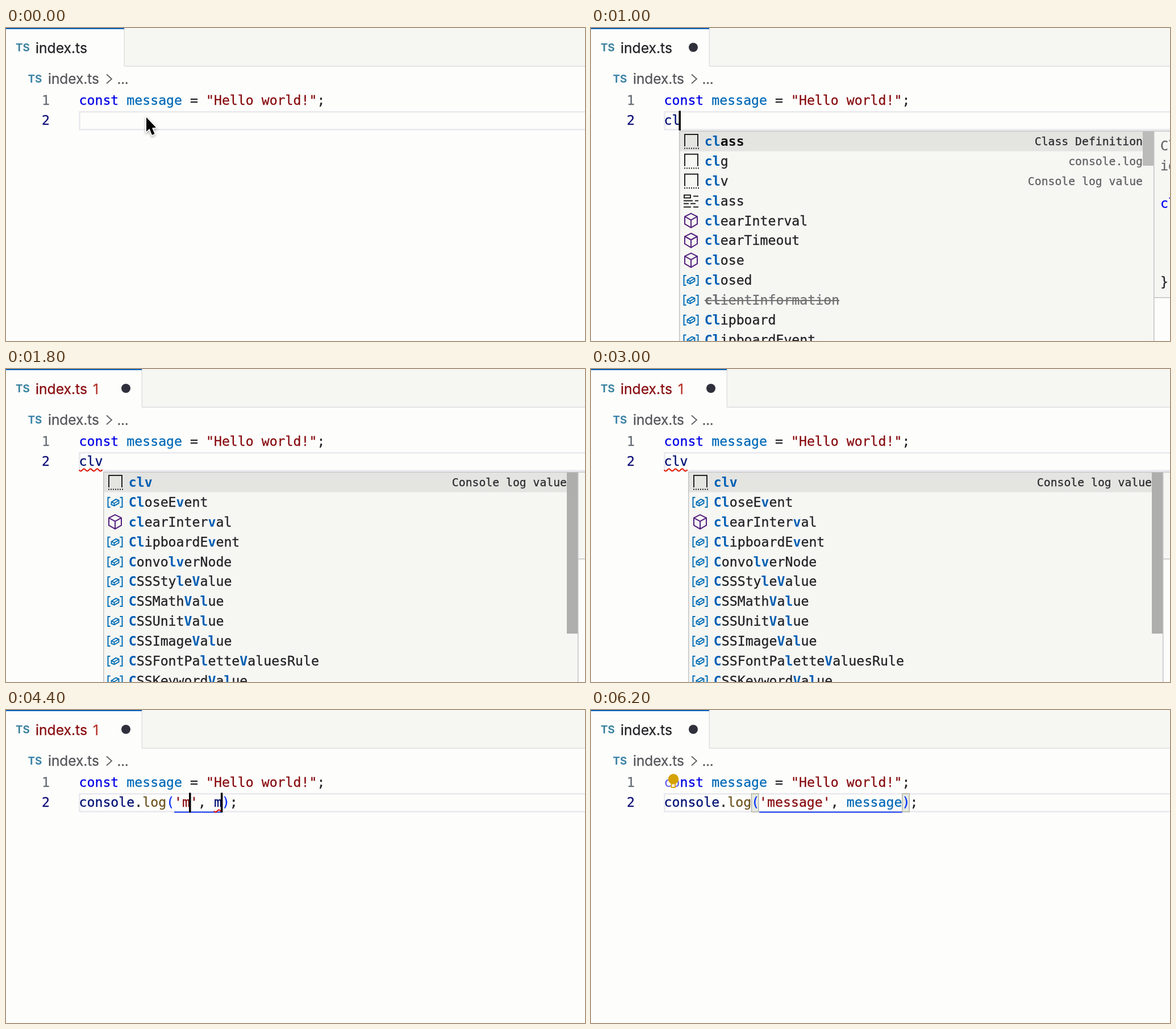
Animation, 1019 px wide and 550 px high, one loop 6.4 s. Source, as an HTML page with a canvas:

```html
<!DOCTYPE html>
<html lang="en">
<head>
<meta charset="utf-8">
<title>Snippet demo</title>
<style>
html, body { margin: 0; width: 100%; height: 100%; overflow: hidden; background: #fdfdfb; }
canvas { display: block; }
</style>
</head>
<body>
<canvas id="stage" width="1019" height="550"></canvas>
<script>
const ctx = document.getElementById('stage').getContext('2d');
const LOOP = 6400, STEP = 200;
const LEFT = 128.5, CHAR = 13.967, ROW = 34.85;
const LINE1 = 135.4, LINE2 = LINE1 + ROW - 0.2;
const MONO = '"DejaVu Sans Mono", monospace';
const UI = 'Inter, sans-serif';
const PAPER = '#fdfdfb', PANEL = '#f6f6f3';
const RED = '#880c10', NAVY = '#001074', BLUE = '#0069b8', INK = '#222226', LINK = '#0431fa';

// Key presses: time and the word that stands after it
const KEYS = [[-900, ''], [550, 'c'], [750, 'cl'], [1260, 'clv'], [3150, 'value'],
  [4350, 'm'], [4550, 'me'], [4750, 'mess'], [4950, 'messag'], [5150, 'message'], [5350, 'message']];

// Icon kind, label with *matches*, detail
const LISTS = {
  cl: [['snippet', '*cl*ass', 'Class Definition'], ['snippet', '*cl*g', 'console.log'],
    ['snippet', '*cl*v', 'Console log value'], ['keyword', '*cl*ass'],
    ['method', '*cl*earInterval'], ['method', '*cl*earTimeout'], ['method', '*cl*ose'],
    ['value', '*cl*osed'], ['value', '*cl*ientInformation', '', true],
    ['value', '*Cl*ipboard'], ['value', '*Cl*ipboardEvent']],
  clv: [['snippet', '*clv*', 'Console log value'], ['value', '*Cl*oseE*v*ent'],
    ['method', '*cl*earInter*v*al'], ['value', '*Cl*ipboardE*v*ent'],
    ['value', '*C*onvo*lv*erNode'], ['value', '*C*SSSty*l*e*V*alue'],
    ['value', '*C*SSMath*V*a*l*ue'], ['value', '*C*SSUnit*V*a*l*ue'],
    ['value', '*C*SSImage*V*a*l*ue'], ['value', '*C*SSFontPa*l*ette*V*aluesRule'],
    ['value', '*C*SSKeyword*V*a*l*ue']]
};

const colX = n => LEFT + n * CHAR;

function rect(x, y, w, h, color) {
  ctx.fillStyle = color;
  ctx.fillRect(x, y, w, h);
}

function path(points, color, width, close) {
  ctx.beginPath();
  points.forEach(([x, y]) => ctx.lineTo(x, y));
  if (close) ctx.closePath();
  ctx.strokeStyle = color;
  ctx.lineWidth = width;
  ctx.stroke();
}

// Regular text gets a hairline outline for a slightly fuller weight
function text(s, x, y, color, size = 23.2, weight = 400, font = MONO) {
  ctx.font = `${weight} ${size}px ${font}`;
  ctx.fillStyle = ctx.strokeStyle = color;
  ctx.fillText(s, x, y);
  if (weight === 400) {
    ctx.lineWidth = 0.3;
    ctx.strokeText(s, x, y);
  }
}

function dot(x, y, r, color) {
  ctx.beginPath();
  ctx.arc(x, y, r, 0, 7);
  ctx.fillStyle = color;
  ctx.fill();
}

// Pairs of text and colour, set one after another
function code(parts, y) {
  let n = 0;
  for (const [s, color] of parts) {
    text(s, colX(n), y, color);
    n += s.length;
  }
}

function squiggle(from, to) {
  const points = [];
  for (let x = colX(from); x <= colX(to); x++) {
    points.push([x, 177.4 + 2 * Math.sin((x - colX(from)) * Math.PI / 5.8)]);
  }
  path(points, '#e51400', 2);
}

function tabs(edited, error) {
  const edge = error ? 239 : 208;
  rect(edge, 0, 1019, 67, PANEL);
  rect(edge, 66.5, 1019, 1.5, '#dfdfe0');
  rect(edge - 0.5, 0, 1.5, 67, '#dfdfe0');
  rect(0, 0, edge, 2, '#005fb8');
  text('TS', 17, 41, '#3c84a0', 18.8, 700, UI);
  text('index.ts', 52, 43.6, error ? RED : INK, 24.7, 400, UI);
  if (error) text('1', 153, 43.6, '#b5342a', 24.7, 400, UI);
  if (edited) dot(edge - 28, 34, 8, '#30303c');

  text('TS', 38.5, 96, '#3c84a8', 18.8, 700, UI);
  text('index.ts', 74, 98.4, '#55555a', 24.4, 400, UI);
  path([[177, 81.5], [186, 89.5], [177, 97.5]], '#606064', 1.8);
  for (let i = 0; i < 3; i++) dot(199 + i * 6.6, 96.8, 1.7, '#55555a');
}

const icons = {
  snippet() {
    path([[-11, 9], [-11, -12], [12, -12], [12, 9]], '#222', 2);
    for (let x = -12; x < 13; x += 4) rect(x, 11.5, 2, 2, '#222');
  },
  keyword() {
    const bar = (x, y, w) => rect(x, y, w, 2, '#222');
    ctx.strokeStyle = '#222';
    ctx.lineWidth = 2;
    ctx.strokeRect(-12, -10, 11, 5);
    bar(4, -9, 9);
    bar(-13, -1, 16);
    bar(7, -1, 6);
    bar(-13, 4, 9);
    bar(-1, 4, 9);
    bar(-13, 10, 13);
    bar(4, 10, 9);
  },
  method() {
    const c = '#54207f';
    path([[0, -12.5], [11, -7], [11, 6], [0, 12.5], [-11, 6], [-11, -7]], c, 2, true);
    path([[-11, -7], [0, -1], [11, -7]], c, 2);
    path([[0, -1], [0, 12.5]], c, 2);
  },
  value() {
    const c = '#006db5';
    for (const s of [-1, 1]) path([[s * 8.5, -8], [s * 12.5, -8], [s * 12.5, 9], [s * 8.5, 9]], c, 2);
    path([[-6.5, 0], [1.5, -5], [6.5, -3], [6.5, 2], [-1.5, 6.5], [-6.5, 4.5]], c, 1.9, true);
    path([[-6.5, 0], [-1.5, 2], [6.5, -3]], c, 1.7);
    path([[-1.5, 2], [-1.5, 6.5]], c, 1.7);
  }
};

function label(marked, x, y, focused, struck) {
  let n = 0;
  marked.split('*').forEach((s, i) => {
    const hit = i % 2;
    const color = struck ? '#707072' : hit ? '#005fb4' : focused ? '#111' : INK;
    text(s, x + n * CHAR, y, color, 23.2, hit || focused ? 700 : 400);
    n += s.length;
  });
  if (struck) rect(x, y - 8, n * CHAR, 2, '#707072');
}

function popup(word) {
  const long = word === 'cl';
  const x = long ? 156 : 172, right = x + 835;
  const border = '#c3c3c6';

  rect(right, 181, 40, long ? 293 : 153, PANEL);
  rect(right, 180.5, 40, 1.5, border);
  rect(right, long ? 473 : 333, 40, 1.5, border);
  if (long) {
    text('Class', 1002, 215, '#66666a');
    text('identifier', 1002, 250, '#66666a');
    text('class', 1002, 315.5, '#0000f0');
    text('}', 1002, 454, INK);
  }

  rect(x, 181, 835, 380, PANEL);
  rect(x, 182, 835, 34.5, '#e4e4e1');
  LISTS[word].forEach(([icon, name, detail, struck], i) => {
    const y = 199 + i * ROW;
    ctx.save();
    ctx.translate(x + 20, y);
    icons[icon]();
    ctx.restore();
    label(name, x + 43.8, y + 8.1, i === 0, struck);
    if (detail) {
      ctx.textAlign = 'right';
      text(detail, right - 20, y + 7, i ? '#606064' : '#2c2c30', 19.75);
      ctx.textAlign = 'left';
    }
  });
  rect(right - 20, 182, 20, long ? 60 : 283, long ? '#bbbbb9' : '#aeaeac');
  rect(x - 1, 180.5, 836, 1.5, border);
  rect(x - 1, 181, 1.5, 380, border);
  rect(right - 1, 181, 1.5, 380, border);
}

function mouse() {
  ctx.save();
  ctx.translate(247, 157);
  ctx.beginPath();
  [[0, 0], [0, 25], [5.5, 20], [10, 31], [14.5, 29], [10, 18.5], [17, 18]].forEach(p => ctx.lineTo(...p));
  ctx.closePath();
  ctx.shadowColor = 'rgba(0,0,0,.35)';
  ctx.shadowBlur = 4;
  ctx.shadowOffsetY = 2;
  ctx.strokeStyle = '#fff';
  ctx.lineWidth = 3;
  ctx.stroke();
  ctx.shadowColor = 'transparent';
  ctx.fillStyle = '#000';
  ctx.fill();
  ctx.restore();
}

function bulb() {
  rect(129, 112, 26, 26, 'rgba(253,253,251,.4)');
  rect(141, 129, 8, 8, PAPER);
  dot(145, 121.5, 9.2, '#d6a200');
  path([[141.5, 128], [141.5, 136], [148, 136], [148, 128]], '#d6a200', 1.8);
}

function bracket(n) {
  rect(colX(n) + 0.3, 147, 12.4, 32, '#e6e9df');
  ctx.strokeStyle = '#b4b6aa';
  ctx.lineWidth = 1.5;
  ctx.strokeRect(colX(n) + 0.3, 147, 12.4, 32);
}

function draw(t) {
  const [pressed, word] = KEYS.filter(k => k[0] <= t).pop();
  const expanded = t >= 3200, selecting = word === 'value', done = t >= 5400;
  const error = t >= 1600 && t < 5600;
  const len = word.length, second = 16 + len;

  rect(0, 0, 1019, 550, PAPER);
  tabs(t >= 600, error);

  if (!selecting) {
    ctx.strokeStyle = '#e8e8ee';
    ctx.lineWidth = 2.5;
    ctx.strokeRect(129.5, 147.3, 900, 31.2);
  }
  text('1', 63, LINE1, '#666d76');
  text('2', 63, LINE2, '#110e78');
  code([['const ', '#0000e6'], ['message', BLUE], [' = ', INK], ['"Hello world!"', RED], [';', INK]], LINE1);

  let carets = [len];
  if (expanded) {
    carets = done ? [second + len + 1] : [13 + len, second + len];
    if (selecting) {
      ctx.fillStyle = '#a6cfff';
      for (const n of [13, second]) {
        ctx.beginPath();
        ctx.roundRect(colX(n), 147, len * CHAR, 32, 5);
        ctx.fill();
      }
    }
    if (done) [11, second + len].forEach(bracket);
    code([['console', NAVY], ['.', INK], ['log', '#6e5520'], ['(', LINK], [`'${word}'`, RED], [', ', INK],
      [word, t >= 5600 ? BLUE : NAVY], [')', LINK], [';', INK]], LINE2);
    rect(colX(12), 178.5, (4 + 2 * len) * CHAR, 2, '#1034ee');
  } else {
    code([[word, NAVY]], LINE2);
  }

  if (error) {
    if (t < 3600) squiggle(0, 3);
    else squiggle(second, second + len);
  }
  if ((t - pressed) % 1000 < 500) carets.forEach(n => rect(colX(n) - 2, 145.5, 3.5, 34.5, '#000'));
  if (!expanded && LISTS[word]) popup(word);
  if (t >= 5800) bulb();
  if (t < 600) mouse();
}

function tick() {
  draw(Math.floor(performance.now() % LOOP / STEP) * STEP);
  requestAnimationFrame(tick);
}
tick();
</script>
</body>
</html>
```
